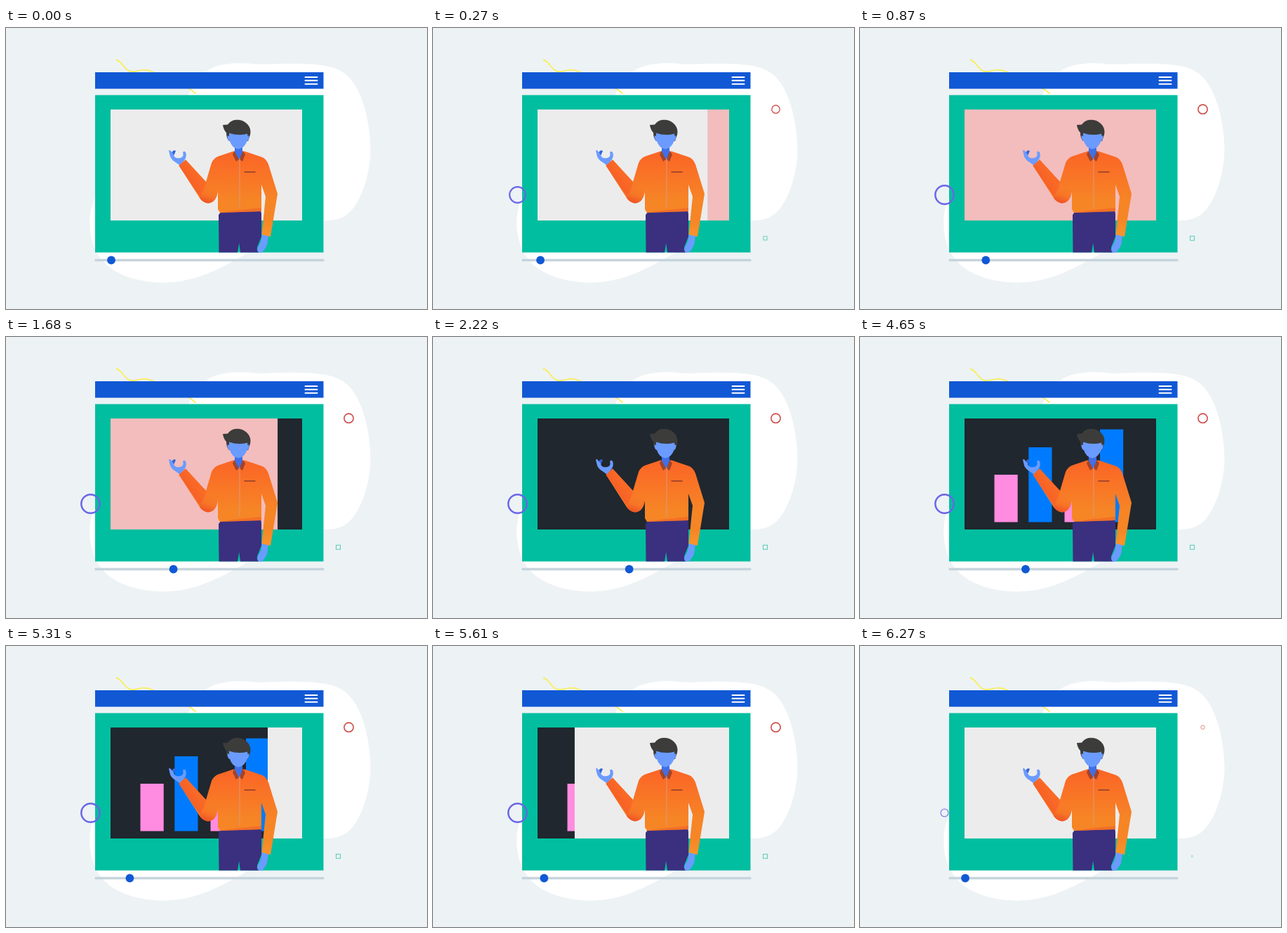
Recreate the animation shown at these times as an HTML page. Size 600 px wide and 400 px high, loop 7.27 s.

```html
<!DOCTYPE html>
<html lang="en">
<head>
<meta charset="utf-8">
<title>Presenter</title>
<style>
html, body { margin: 0; width: 100%; height: 100%; overflow: hidden; background: #edf2f5; }
svg { display: block; width: 100vw; height: 100vh; }
</style>
</head>
<body>
<svg viewBox="0 0 600 400">
  <defs>
    <linearGradient id="cloth" gradientUnits="userSpaceOnUse" x1="0" y1="172" x2="0" y2="296">
      <stop offset="0.08" stop-color="#fb6726"/>
      <stop offset="0.6" stop-color="#f68526"/>
      <stop offset="0.82" stop-color="#f68526"/>
      <stop offset="1" stop-color="#f8952b"/>
    </linearGradient>
    <linearGradient id="sleeve" gradientUnits="userSpaceOnUse" x1="256" y1="232" x2="278" y2="217">
      <stop offset="0.2" stop-color="#f55c26"/>
      <stop offset="1" stop-color="#fa6a26"/>
    </linearGradient>
    <linearGradient id="elbow" gradientUnits="userSpaceOnUse" x1="284" y1="250" x2="292" y2="226">
      <stop offset="0" stop-color="#ef4e24"/>
      <stop offset="0.5" stop-color="#f77526"/>
      <stop offset="1" stop-color="#f77526" stop-opacity="0"/>
    </linearGradient>
  </defs>

  <path fill="#fff" d="M262 90C272 69 287 51 330 50C352 50 357 53 380 51C432 50 463 50 483 65C508 84 519 134 519.500 174
    C519 208 507 245 490 262C478 273 466 274 455 274C415 279 380 301 345 320C305 343 270 362 225 362.500
    C183 362 151 349 136 329C120 312 113 272 126 244C145 190 235 165 262 90Z"/>
  <path fill="none" stroke="#fbee58" stroke-width="1.8" stroke-linecap="round"
    d="M157.500 45.500C166 47 168 60 178 62C187 63.500 193 56 208 62C225 69 244 75 257 84Q263 87 270 93"/>

  <path fill="#1158d5" d="M127 63H452.500V86.500H127Z"/>
  <path stroke="#fff" stroke-width="2" stroke-linecap="round" d="M426.500 70H443.500M426.500 74.800H443.500M426.500 79.800H443.500"/>
  <path fill="#00be9f" d="M127 95.500H452.500V319.500H127Z"/>

  <g id="screen">
    <path fill="#ececec" d="M149 116H422V274H149Z"/>
    <rect id="pink" fill="#f3bdbd"/>
    <rect id="dark" fill="#20272e"/>
    <g id="bars"></g>
    <rect id="blank" fill="#ececec"/>
  </g>

  <!-- hands -->
  <path fill="#3465d8" d="M235 181C236 176 239 173 242 175L239 182Z"/>
  <path fill="#6b9bff" d="M232 174.500Q234 173 235.500 176L239 180C239 184 243 186 248 185C253 184 253 180 252 177
    Q254 174 256 177C258 182 256 186 253 190L248 196C243 191 236 189 234 183Z"/>
  <path fill="#6b9bff" d="M365 293L374.500 295C372 302 374 307 370 313L365 319.500H359Q357 315 360 310C364 305 364 300 365 293Z"/>

  <!-- trousers and jacket -->
  <path fill="#3b2f7f" d="M306 262L362 260Q364 261 364 265V297L358 312Q357 317 360 319.500H334L332.200 306L330 319.500H303.500L303 266Z"/>
  <path fill="url(#cloth)" d="M324 175.500L340 175.500L364 183.500Q371 186 374 194L387 236L377 297L364.500 294L370 240L364 223V261L305 263L302 258
    V233C300 243 296 249 288 249.500Q281 249 276 242L246.500 196L256 187.500L285 219L293 192Q296 185 303 182.500Z"/>
  <path fill="url(#sleeve)" d="M246.500 196L256 187.500L285 219L279 244Z"/>
  <path fill="url(#elbow)" d="M285 219L302 233C300 243 296 249 288 249.500Q281 249 276 242Z"/>
  <path fill="#ef5a26" opacity="0.5" d="M325 260L364 256V261L305 263Z"/>
  <path fill="#3f70e9" d="M326 166H337V178L332.500 188L326 178Z"/>
  <path fill="#a0452b" d="M325.500 175L332 187L328 190L323 180ZM337.500 175L332.500 187L337 190L341 180Z"/>
  <path stroke="#d99a7c" stroke-width="1" d="M333 185V256"/>
  <path stroke="#a0452b" stroke-width="1.800" d="M339.500 205H355.500"/>

  <!-- head -->
  <path fill="#3c3c3b" d="M309 138L316 137.500C321 130 330 129.500 337 132C346 136 350 144 348 152L345 161H318Q314 157 314 149Q310 145 309 138Z"/>
  <path fill="#6b9bff" d="M318 149.500Q331 154 344 150.500L344.500 154Q346.500 152 346.500 155Q346 160 343.500 161Q340 171 331 172.500
    Q322 171 319 161Q316 160 315.500 155Q315.500 152 318 154Z"/>

  <path stroke="#c6d4dc" stroke-width="3.400" stroke-linecap="round" d="M128 330.500H452"/>
  <circle id="knob" cy="330.500" r="5.900" fill="#1158d5"/>

  <g fill="none">
    <circle class="pop" data-at="120.500,237.500" r="13.200" stroke="#6a66e8" stroke-width="2.500"/>
    <circle class="pop" data-at="488.500,115.700" r="6.600" stroke="#cf4d48" stroke-width="1.600"/>
    <rect class="pop" data-at="473.500,299.300" x="-3" y="-3" width="6" height="6" stroke="#55cdb8" stroke-width="1"/>
  </g>
</svg>
<script>
const LOOP = 7270, STEP = 30, LAST = 6270, MOVE = 670;
const LEFT = 149, RIGHT = 422, BASE = 263.5;
const el = id => document.getElementById(id);
const pops = [...document.querySelectorAll('.pop')];

function set(node, attrs) {
  for (const name in attrs) node.setAttribute(name, attrs[name]);
}

// Eased progress from start to end, 0 to 1
function ease(t, start, end = start + MOVE) {
  const p = Math.min(1, Math.max(0, (t - start) / (end - start)));
  return p * p * (3 - 2 * p);
}

// Each cover slides over the screen from its right edge
const covers = [['pink', 130], ['dark', 1530], ['blank', 5129]].map(([id, start]) => {
  set(el(id), { y: 116, height: 158 });
  return { node: el(id), start };
});

const bars = [[191.5, 67.5], [240.3, 106.5], [291.5, 52], [342, 132]].map(([x, h], i) => {
  const node = document.createElementNS('http://www.w3.org/2000/svg', 'rect');
  set(node, { x, width: 33.2, fill: i % 2 ? '#007bff' : '#ff8ce0' });
  el('bars').append(node);
  return { node, h, start: 2717 + i * 190 };
});

function draw(t) {
  set(el('knob'), { cx: 150 + 174.4 * (ease(t, 10, 3315) - ease(t, 3315, 5960)) });

  for (const { node, start } of covers) {
    const width = (RIGHT - LEFT) * ease(t, start);
    set(node, { x: RIGHT - width, width });
  }

  for (const { node, h, start } of bars) {
    const height = h * ease(t, start);
    set(node, { y: BASE - height, height });
  }

  const size = 1.42 * ease(t, 30, 450) - 0.42 * ease(t, 450, 780) - ease(t, 5980, 6500);
  for (const pop of pops)
    set(pop, { transform: `translate(${pop.dataset.at}) scale(${Math.max(0, size)})` });
}

function tick() {
  const t = performance.now() % LOOP;
  draw(Math.min(LAST, Math.floor(t / STEP) * STEP));
  requestAnimationFrame(tick);
}
tick();
</script>
</body>
</html>
```
